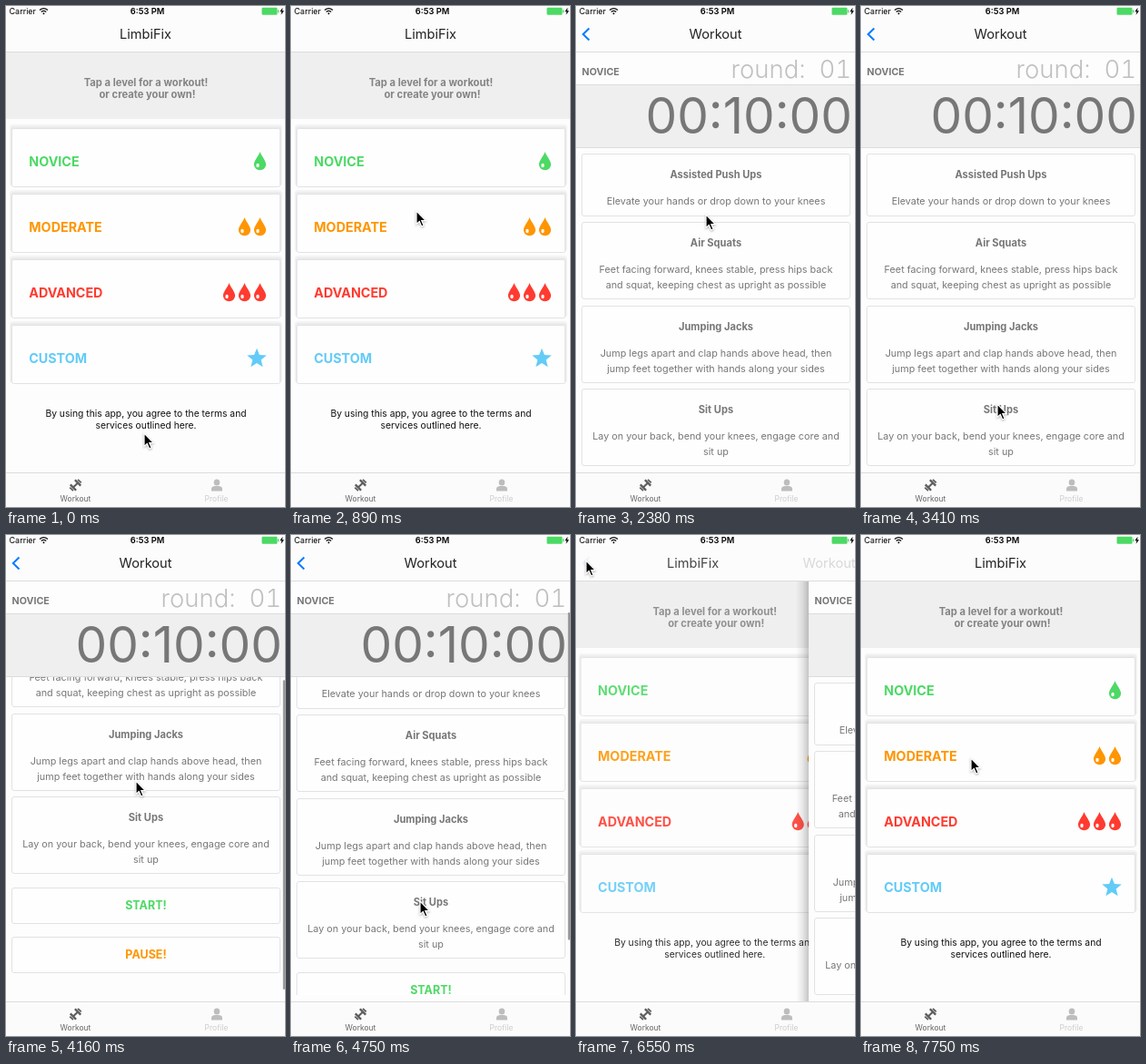
Recreate the animation shown at these times as an HTML page. Size 307 by 550 pixels, loop 8 s.

```html
<!DOCTYPE html>
<html lang="en">
<head>
<meta charset="utf-8">
<title>Workout app</title>
<style>
html, body { margin: 0; width: 100%; height: 100%; overflow: hidden; background: #fdfdfd; }
svg { display: block; width: 307px; height: 550px; font-family: Inter, Roboto, sans-serif; }
text { text-anchor: middle; white-space: pre; }
.left { text-anchor: start; }
.right { text-anchor: end; }
.title { font-size: 14.6px; fill: #222; }
.level { font-size: 14.3px; font-weight: 700; text-anchor: start; }
.sub { font-size: 11.2px; font-weight: 700; fill: #848484; }
.terms { font-size: 10.35px; fill: #111; }
.head { font-size: 11.1px; font-weight: 700; fill: #777; }
.body { font-size: 10.8px; fill: #777; }
.button { font-size: 12.5px; font-weight: 700; }
.tab { font-size: 8.5px; }
.round { font-size: 27.5px; font-weight: 300; font-variant-numeric: tabular-nums; fill: #c0c0c0; }
.timer { font-size: 55px; fill: #777; }
.card { fill: #fefefe; stroke: #e2e2e2; }
.rule { stroke: #dcdcdc; }
</style>
</head>
<body>
<svg viewBox="0 0 307 550">
  <defs>
    <clipPath id="list"><rect y="156" width="307" height="349"/></clipPath>
    <linearGradient id="edge">
      <stop offset="0" stop-opacity="0"/>
      <stop offset=".5" stop-opacity=".08"/>
      <stop offset="1" stop-opacity=".22"/>
    </linearGradient>
    <g id="drop">
      <path d="M0-10C1-6 6.6-.5 6.6 4A6.6 6.2 0 0 1-6.6 4C-6.6-.5-1-6 0-10Z"/>
      <ellipse cx="-2.5" cy="5" rx="1.7" ry="2.3" fill="#fff"/>
    </g>
  </defs>
  <rect width="307" height="550" fill="#fdfdfd"/>

  <rect y="51" width="307" height="73" fill="#efefef"/>
  <g id="home">
    <text class="sub" x="154" y="87.5">Tap a level for a workout!</text>
    <text class="sub" x="155.5" y="101">or create your own!</text>
    <g id="levels"></g>
    <text class="terms" x="154" y="450.5">By using this app, you agree to the terms and</text>
    <text class="terms" x="154" y="463.5">services outlined here.</text>
  </g>

  <g id="detail">
    <rect x="-14" y="51" width="14" height="461" fill="url(#edge)"/>
    <rect y="51" width="307" height="461" fill="#fdfdfd"/>
    <g clip-path="url(#list)"><g id="moves"></g></g>
    <rect y="87" width="307" height="68" fill="#efefef"/>
    <path class="rule" d="M0 86.5H307M0 155.5H307"/>
    <text class="left" x="6.5" y="76" font-size="10.7" font-weight="700" fill="#777">NOVICE</text>
    <text class="right round" x="303" y="78.8">round:  01</text>
    <text class="right timer" x="304" y="140.3">00:10:00</text>
    <rect id="bar" x="304.8" width="2.2" rx="1.1" fill="#777"/>
  </g>

  <rect width="307" height="50" fill="#fcfcfc"/>
  <path class="rule" d="M0 50.5H307"/>
  <text id="homeTitle" class="title" x="153.5" y="36">LimbiFix</text>
  <text id="detailTitle" class="title" x="153.5" y="36">Workout</text>
  <path id="back" d="M14.5 24.5L7.8 31L14.5 37.5" fill="none" stroke="#0a7cff" stroke-width="2"/>

  <text class="left" x="3.5" y="9" font-size="9">Carrier</text>
  <g fill="none" stroke="#111" stroke-width="1.3">
    <path d="M37 4.5Q41.5 .8 46 4.5M38.8 6.5Q41.5 4.2 44.2 6.5"/>
    <circle cx="41.5" cy="8.3" r=".7" fill="#111" stroke-width=".6"/>
  </g>
  <text x="155.5" y="9" font-size="9.3" font-weight="600">6:53 PM</text>
  <rect x="281.5" y="1.8" width="17" height="8" rx="1.2" fill="#4cd964"/>
  <rect x="299" y="4.3" width="1.2" height="3" fill="#4cd964"/>
  <path d="M304.5 1.8L301.3 6.3H303.3L302.6 9.8L306 5.2H304Z"/>

  <rect y="512" width="307" height="38" fill="#fbfbfb"/>
  <path class="rule" d="M0 512.5H307"/>
  <g transform="translate(76.5 526) rotate(-45)" fill="none" stroke="#5d5d5d">
    <path d="M-4 0H4" stroke-width="2"/>
    <path d="M-3.6-4.5V4.5M3.6-4.5V4.5" stroke-width="2.4"/>
    <path d="M-6.2-2.6V2.6M6.2-2.6V2.6" stroke-width="1.8"/>
  </g>
  <text class="tab" x="76.5" y="544" fill="#666">Workout</text>
  <g fill="#bdbdbd">
    <ellipse cx="232" cy="523" rx="3.3" ry="3.6"/>
    <path d="M226 532.5V530Q226 527.5 229.5 527H234.5Q238 527.5 238 530V532.5Z"/>
  </g>
  <text class="tab" x="231.5" y="544" fill="#cecece">Profile</text>

  <path id="cursor" d="M0 0V14.5L3.3 11.5L5.7 17L8.1 16L5.8 10.6H10.3Z" stroke="#fff" stroke-width="1.2"
        style="filter: drop-shadow(0 1px 1px rgba(0,0,0,.3))"/>
</svg>
<script>
const $ = id => document.getElementById(id);
const text = (cls, x, y, str, fill = '') =>
  `<text class="${cls}" x="${x}" y="${y}"${fill && ` fill="${fill}"`}>${str}</text>`;

// Home screen levels
const star = [...Array(10).keys()].map(i => {
  const r = i % 2 ? 4.9 : 11.3, a = i * Math.PI / 5;
  return `${276 + r * Math.sin(a)},${387 - r * Math.cos(a)}`;
}).join(' ');
const levels = [['NOVICE', '#4cd964', 1], ['MODERATE', '#ff9500', 2], ['ADVANCED', '#ff3b30', 3], ['CUSTOM', '#62cbf8', 0]];
$('levels').innerHTML = levels.map(([name, color, drops], i) => {
  const y = 135 + 72 * i;
  let icons = drops ? '' : `<polygon points="${star}"/>`;
  for (let k = 0; k < drops; k++) icons += `<use href="#drop" x="${279.5 - 17 * k}" y="${y + 35}"/>`;
  return `<g fill="${color}">
    <rect x="4" y="${y - 5}" width="300" height="68" rx="4" fill="#f4f4f4"/>
    <rect x="5" y="${y - 3}" width="298" height="66" rx="3" fill="#ebebeb"/>
    <rect class="card" x="6.5" y="${y - .5}" width="295" height="64" rx="2"/>
    ${text('level', 25.3, y + 41, name)}${icons}</g>`;
}).join('');

// Workout list
const moves = [
  [162, 68, 'Assisted Push Ups', 'Elevate your hands or drop down to your knees'],
  [237, 84, 'Air Squats', 'Feet facing forward, knees stable, press hips back', 'and squat, keeping chest as upright as possible'],
  [329, 84, 'Jumping Jacks', 'Jump legs apart and clap hands above head, then', 'jump feet together with hands along your sides'],
  [420, 84, 'Sit Ups', 'Lay on your back, bend your knees, engage core and', 'sit up']
];
const card = (y, h) => `<rect class="card" x="6.5" y="${y + .5}" width="295" height="${h}" rx="2.5"/>`;
$('moves').innerHTML = moves.map(([y, h, name, ...lines]) =>
  card(y, h) + text('head', 154, y + 27, name) +
  lines.map((line, i) => text('body', 154, y + 56 + 16.5 * i, line)).join('')
).join('') +
  card(520, 39) + text('button', 154, 544, 'START!', '#4cd964') +
  card(574, 39) + text('button', 154, 598, 'PAUSE!', '#ff9500');

// Tracks: [tick, value, ...], linear between points
const pointer = [
  [2, 152, 469], [4, 150, 400], [6, 138, 225], [7, 131, 185], [8, 131, 183], [14, 131, 183],
  [16, 143, 229], [19, 147, 340], [22, 150, 430], [23, 150, 437], [25, 150, 437],
  [26, 149, 407], [28, 143, 270], [29, 143, 264], [30, 142, 300], [32, 142, 402], [33, 142, 438],
  [37, 74, 215], [40, 11, 28], [44, 11, 28], [47, 38, 85], [50, 81, 185], [52, 121, 245]
];
const scroll = [[25, 0], [26, 30], [28, 133], [29, 137], [30, 121], [32, 40], [33, -1], [34, 0]];
const barFade = [[25, 0], [26, .75], [33, .75], [36, 0]];
const press = [[7, 1], [8, .55], [9, .55], [12, 1]];
const backPress = [[41, 1], [42, .4], [44, .4]];

function at(track, n) {
  const i = track.findIndex(p => p[0] >= n);
  if (i <= 0) return track.at(i).slice(1);
  const a = track[i - 1], b = track[i], f = (n - a[0]) / (b[0] - a[0]);
  return a.slice(1).map((v, k) => v + (b[k + 1] - v) * f);
}

// 0 = home, 1 = workout
function pushed(n) {
  if (n < 9) return 0;
  if (n < 14) return 1 - .2245 ** (n - 9);
  if (n < 43) return 1;
  return n < 48 ? .166 ** (n - 43) : 0;
}

const put = (el, x, y, opacity = 1) => {
  el.setAttribute('transform', `translate(${x} ${y})`);
  el.setAttribute('opacity', opacity);
};

const LOOP = 8000, TICK = 148.6, VIEW = 450, CONTENT = 563;

function draw(now) {
  const n = Math.floor(now % LOOP / TICK + .08);
  const p = pushed(n), [off] = at(scroll, n);
  put($('home'), -7.5 * p, 0, 1 - .7 * p);
  put($('detail'), 307 * (1 - p), 0);
  $('detail').style.display = p ? '' : 'none';
  put($('homeTitle'), -150 * p, 0, 1 - p);
  put($('detailTitle'), 150 * (1 - p), 0, p);
  put($('back'), 0, 0, p * at(backPress, n)[0]);
  put($('levels').firstElementChild, 0, 0, at(press, n)[0]);
  put($('moves'), 0, -off);

  const over = Math.max(0, off - (CONTENT - VIEW), -off);
  const len = VIEW * VIEW / CONTENT - over;
  const top = Math.min(Math.max(0, off * VIEW / CONTENT), VIEW - len);
  $('bar').setAttribute('y', 53 + top);
  $('bar').setAttribute('height', len);
  $('bar').setAttribute('opacity', at(barFade, n)[0]);

  put($('cursor'), ...at(pointer, n));
}

const start = performance.now();
(function loop() {
  draw(performance.now() - start);
  requestAnimationFrame(loop);
})();
</script>
</body>
</html>
```
